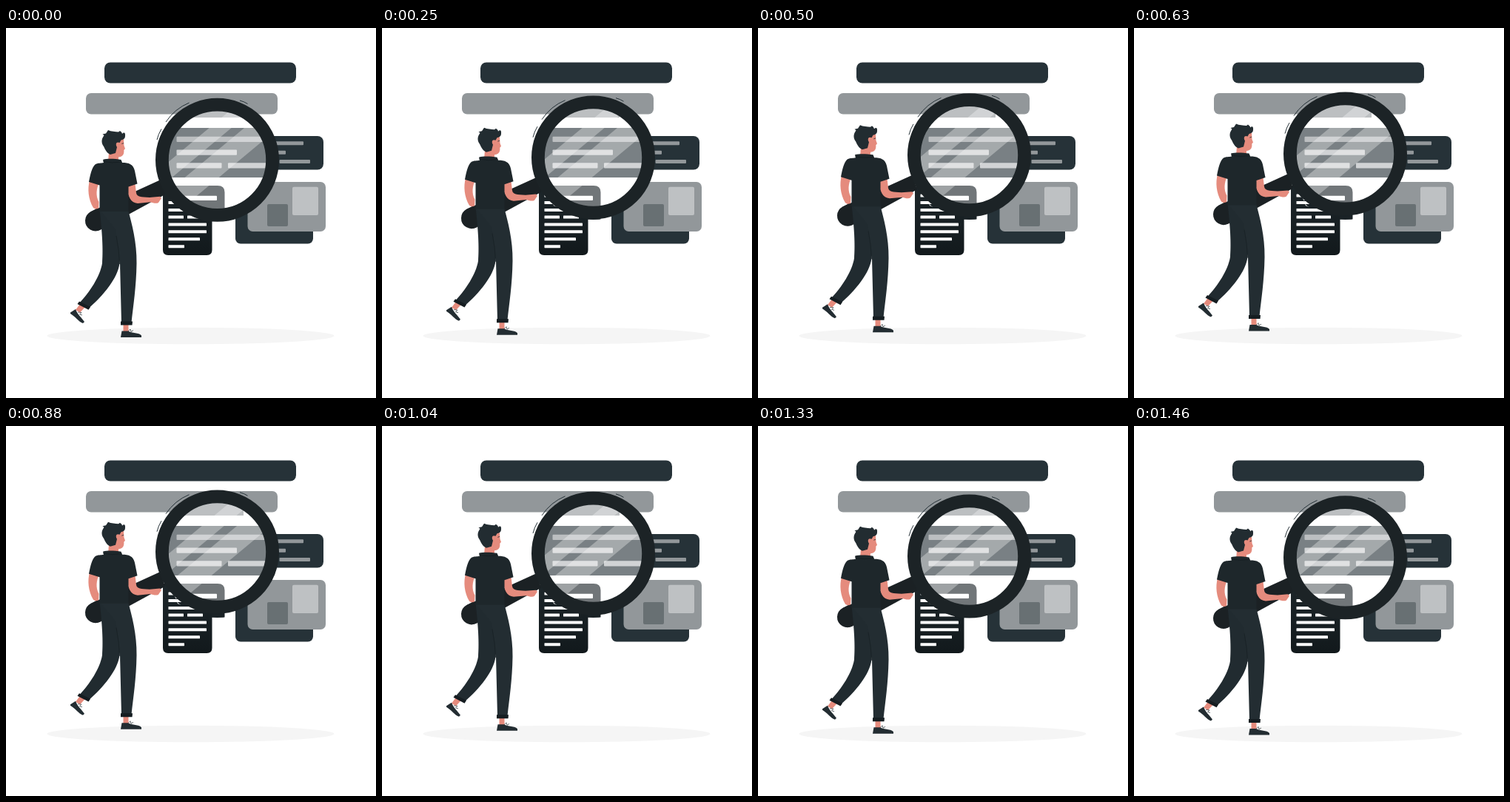
Animation of 500 by 500 pixels, one loop 1500 ms. Source, as an HTML page:

```html
<!DOCTYPE html>
<html lang="en">
<head>
<meta charset="utf-8">
<style>
html, body { margin: 0; width: 100%; height: 100%; overflow: hidden; background: #fff; }
svg { display: block; width: 100%; height: 100%; }
</style>
</head>
<body>
<svg viewBox="0 0 500 500">
  <defs>
    <clipPath id="zoomClip"><circle cx="285.5" cy="178.3" r="80.7"/></clipPath>
    <clipPath id="glassClip"><circle cx="285.5" cy="178.3" r="67"/></clipPath>
    <linearGradient id="page" x1="0" y1="0" x2="0" y2="1">
      <stop offset="0" stop-color="#1d262a"/><stop offset="1" stop-color="#12191c"/>
    </linearGradient>
  </defs>

  <ellipse cx="249.5" cy="416" rx="194" ry="11.3" fill="#f5f5f5"/>

  <!-- panels -->
  <rect x="133" y="46.5" width="259" height="28" rx="8" fill="#263238"/>
  <rect x="108" y="88" width="259" height="28.5" rx="7" fill="#92979a"/>
  <rect x="300" y="146" width="129" height="45.5" rx="8" fill="#263238"/>
  <g fill="#92979a">
    <rect x="330" y="153.3" width="72" height="5" rx="1"/>
    <rect x="330" y="165.8" width="48" height="5" rx="1"/>
    <rect x="369.5" y="178" width="41.5" height="5" rx="1"/>
  </g>
  <rect x="310" y="224.5" width="105" height="67" rx="7" fill="#263238"/>
  <rect x="326.5" y="208" width="105.5" height="67" rx="7" fill="#92979a"/>
  <rect x="387" y="214.7" width="35" height="38.3" rx="2" fill="#bec1c3"/>
  <rect x="353" y="238" width="28" height="30" rx="2" fill="#687073"/>

  <!-- enlarged content under the glass -->
  <circle cx="285.5" cy="174" r="70" fill="#fff"/>
  <g clip-path="url(#zoomClip)">
    <rect x="215" y="85" width="106" height="36" fill="#92979a"/>
    <rect x="200" y="135" width="180" height="67" fill="#263238"/>
    <g fill="#92979a">
      <rect x="230.5" y="146.7" width="140" height="7.3" rx="1"/>
    </g>
    <g fill="#b4b8ba">
      <rect x="230.5" y="164.5" width="81.5" height="7.3" rx="1"/>
      <rect x="230.5" y="182.3" width="61" height="7.3" rx="1"/>
      <rect x="300" y="182.3" width="70" height="7.3" rx="1"/>
    </g>
    <path d="M205 213H286Q295.5 213 295.5 222V270H205Z" fill="#1a2226"/>
    <rect x="219.5" y="226.7" width="65.5" height="6.2" rx="1" fill="#fff"/>
  </g>

  <!-- document, seen only outside the ring -->
  <path d="M212 215H222L232 240 260 252 278.5 254V300Q278.5 307 271.5 307H219Q212 307 212 300Z" fill="url(#page)"/>
  <g id="lines" fill="#fff"></g>

  <g id="float">
    <g clip-path="url(#glassClip)">
      <circle cx="285.5" cy="178.3" r="67" fill="#fff" opacity=".38"/>
      <g fill="#fff" opacity=".32">
        <path d="M304.6 110H334.6L166.6 250H136.6Z"/>
        <path d="M352 110H398L230 250H184Z"/>
      </g>
    </g>
    <path d="M208.5 205.3 114.5 248.2A14 14 0 0 0 127.5 272.8L215 225Z" fill="#1b2124"/>
    <circle cx="285.5" cy="178.3" r="74.6" fill="none" stroke="#1c2326" stroke-width="17.8"/>
    <g fill="none" stroke="#263238" stroke-width="1">
      <path d="M216 127Q228 109 247.500 101"/>
      <path d="M204 151Q206 143 210 136.500"/>
      <path d="M316 98Q322 99.500 326.500 102.500"/>
    </g>

    <!-- arm behind -->
    <path d="M113 206C110 217 111 231 118 243L125 247 125.500 235C121 227 122 217 126 209Z" fill="#e58b7d"/>
    <path d="M107 260A14 14 0 0 1 114.500 248.200Q121 244 128 243V272.500A14 14 0 0 1 107 260Z" fill="#1b2124"/>

    <!-- legs -->
    <g fill="#e58b7d">
      <path d="M158.500 399H165.500V411H158.500Z"/>
      <path d="M100 373 107 377 100 384.500 94 381Z"/>
    </g>
    <path d="M126.500 246C131 285 131 302 130 318C127 336 113 357 99 372L111.500 379C132 361 151 338 153.500 318L158 280 150 246Z" fill="#212b30"/>
    <path d="M127 246H165C170 264 177 290 176.500 318C176 350 172 375 169.500 398H156L154 318C153 300 150 285 148 272Z" fill="#232d32"/>
    <path d="M149 281Q153 300 153.500 319" fill="none" stroke="#182125" stroke-width=".8"/>
    <g fill="#151d21">
      <path d="M155 396.500H171L170.500 401.500H155Z"/>
      <path d="M99 369.500 114 377 111.500 380.800 96.500 373Z"/>
    </g>
    <g fill="#232d32">
      <path d="M156.500 409.500H165C170 412.500 180 411.500 183 415.500V418H155Z"/>
      <path d="M87 384.500 94 380C97 388 102 391 106 397L104 399C98 397 94 390 87 386Z"/>
    </g>
    <path d="M165 410 168 407 169 410.500 172 408.500M97 384 102 384.500 99.500 387 103 388" fill="none" stroke="#232d32" stroke-width=".7"/>

    <!-- head -->
    <path d="M147 153 159 150 159.500 159 161 163 159.300 165C160 171 157 174.500 152 174.500L152 181H138L139 168Z" fill="#e58b7d"/>
    <path d="M138 138C142 140 148 140 152 140.500L154 139Q157 141 157 143C160 140 161.500 142 161 146C161 150 158 151 155.500 151.500L153.500 155C149 153 147.500 157 150 161L148 169 141 171C136 169 134 164 132 160C129 156 129 152 130.500 148.500L132.500 145 130.500 143.500 135 142.500Z" fill="#222c31"/>
    <path d="M156.300 156.500 159 155.500" stroke="#222c31" stroke-width=".8"/>

    <!-- shirt and front arm -->
    <path d="M163 213 174.500 210.500 176 223C177 228 182 228.500 194 229L208 227.800 210 230 206 236C203 238 198 236 195 235.300L178 237C168 236 165 228 163 213Z" fill="#e58b7d"/>
    <path d="M131 178C138 176 148 177 155.500 178L157 182C166 182 172 184 174 193L177.500 210.500 165.500 214.500V248H126.500V212.500L112 208C114 198 116 188 121 184C125 182 128 183 132 182Z" fill="#1e272b"/>
    <path d="M131.500 180.500Q143 183 156.500 181" fill="none" stroke="#151d21" stroke-width=".8"/>
  </g>
</svg>
<script>
const LOOP = 1500, RISE = 10;
const float = document.getElementById('float');

// row, start, end
const rows = [
  [224.5, 219.5, 230], [234, 219.5, 271], [244, 219.5, 271],
  [253.5, 219.5, 240], [253.5, 245, 266], [263.5, 219.5, 271],
  [273.3, 219.5, 271], [283.3, 219.5, 262], [293.2, 219.5, 241]
];
document.getElementById('lines').innerHTML = rows.map(([y, a, b]) =>
  `<rect x="${a}" y="${y}" width="${b - a}" height="4" rx=".6"/>`).join('');

// clear the page rows that would fall inside the glass
const ns = 'http://www.w3.org/2000/svg';
const mask = document.createElementNS(ns, 'clipPath');
mask.id = 'outside';
mask.innerHTML = '<path clip-rule="evenodd" d="M200 200H300V310H200ZM215.500 174A70 70 0 0 0 355.500 174A70 70 0 0 0 215.500 174Z"/>';
document.querySelector('defs').append(mask);
document.getElementById('lines').setAttribute('clip-path', 'url(#outside)');
document.querySelector('path[fill="url(#page)"]').setAttribute('clip-path', 'url(#outside)');

function draw(ms) {
  const p = (ms % LOOP) / LOOP;
  const lift = RISE * (1 - Math.abs(2 * p - 1));
  float.setAttribute('transform', `translate(0 ${-lift.toFixed(3)})`);
}

let start;
function tick(now) {
  start ??= now;
  draw(now - start);
  requestAnimationFrame(tick);
}
draw(0);
requestAnimationFrame(tick);
</script>
</body>
</html>
```
